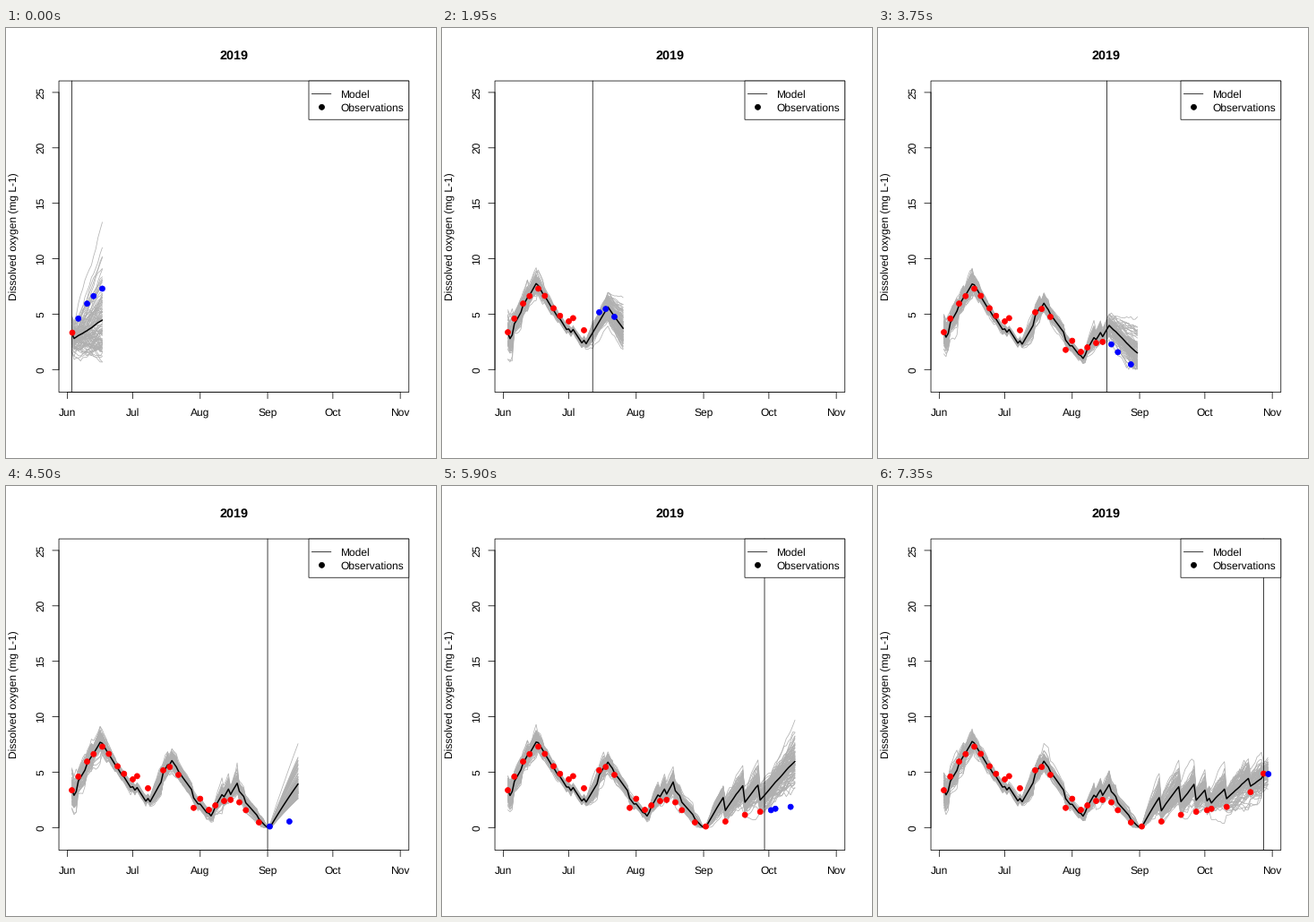
A matplotlib script for the animation above (7.4 s loop, 480 by 480 pixels).

```python
import numpy as np
import matplotlib.pyplot as plt
from matplotlib.animation import FuncAnimation
from matplotlib.collections import LineCollection, PatchCollection
from matplotlib.patches import Circle, Rectangle

SIZE, FRAMES, STEP = 480, 148, 50
FIRST, LAST, HORIZON, MEMBERS = 2, 151, 14, 100   # days since 1 June
LEFT, RIGHT, TOP, BOTTOM = 59.04, 449.76, 59.04, 406.56

# Measured oxygen by day
OBS = {2: 3.37, 5: 4.6, 9: 5.95, 12: 6.63, 16: 7.3, 19: 6.65, 23: 5.53,
       26: 4.85, 30: 4.35, 32: 4.64, 37: 3.55, 44: 5.17, 47: 5.47, 51: 4.76,
       58: 1.78, 61: 2.6, 65: 1.6, 68: 2.0, 72: 2.4, 75: 2.5, 79: 2.28,
       82: 1.57, 88: .47, 93: .1, 102: .55, 111: 1.15, 118: 1.43, 123: 1.57,
       125: 1.7, 132: 1.87, 143: 3.2, 149: 4.87, 151: 4.87}

TURNS = (16, 38, 48, 66, 78, 93)   # days on which the trend reverses


def px(day):
    return 73.51 + 361.78 * (np.asarray(day) - FIRST) / (LAST - FIRST)


def py(value):
    return 381.31 - 12.376 * np.asarray(value)


def trend(day):
    """Daily change of the free-running model."""
    if day == FIRST:
        return -.5   # spin-up
    if np.searchsorted(TURNS, day, side="right") % 2:
        return .0017 * day - .36
    return .34 * np.exp(-max(day - TURNS[-1], 0) / 65)


def ensemble(now, end):
    """Assimilate up to now, then let the members run freely to the end."""
    rng = np.random.default_rng(100 + now)
    age = now - FIRST
    skill = min(1, .4 + .06 * age)
    fan = .07 + .085 * np.exp(-age / 8)
    slope = rng.normal(size=MEMBERS)
    slope += .2 * (slope ** 2 - 1)
    z = rng.normal(size=MEMBERS)
    mean, spread = OBS[FIRST], .7
    rows = [mean + spread * z]
    for day in range(FIRST + 1, end + 1):
        change, keep = trend(day - 1), .96
        rising = change > 0
        mean = max(mean + change * (skill if rising and day > now else 1), 0)
        if day <= now:
            spread += .12 * (1 - spread) if rising else .1 * (.25 - spread)
            if day in OBS:
                gain, keep = (.6 if rising else .35), .6
                mean += gain * (OBS[day] - mean)
                spread *= np.sqrt(1 - gain)
            spread = min(spread, .03 + .45 * mean)
        z = keep * z + np.sqrt(1 - keep ** 2) * rng.normal(size=MEMBERS)
        lead = max(day - now, 0)
        rows.append(np.abs(mean + spread * z + fan * lead * slope))
    return np.array(rows)


plt.rcParams["font.family"] = "Liberation Sans"
plt.rcParams["text.hinting"] = "none"
fig = plt.figure(figsize=(SIZE / 72, SIZE / 72), dpi=72, facecolor="white")
ax = fig.add_axes([0, 0, 1, 1])
ax.set(xlim=(0, SIZE), ylim=(SIZE, 0))
ax.axis("off")


def line(x, y, z=2, width=.75):
    return ax.plot(x, y, color="black", lw=width, zorder=z, snap=False,
                   solid_capstyle="round", solid_joinstyle="round")[0]


def box(x0, y0, x1, y1, z, fill):
    ax.add_patch(Rectangle((x0, y0), x1 - x0, y1 - y0, fc=fill, ec="black",
                           lw=.75, zorder=z, snap=False))


def label(x, y, text, ha="center", size=12, **kw):
    ax.text(x, y, text, ha=ha, va="baseline", fontsize=size, zorder=9,
            rotation_mode="anchor", **kw)


def circles(x, y):
    return [Circle(p, 3) for p in zip(x, y)]


def dots(color, patches=(), z=5):
    group = PatchCollection(patches, facecolor=color, edgecolor=color,
                            linewidth=.75, zorder=z, snap=False)
    ax.add_collection(group, autolim=False)
    return group


box(LEFT, TOP, RIGHT, BOTTOM, 6, "none")
months = dict(Jun=0, Jul=30, Aug=61, Sep=92, Oct=122, Nov=153)
line(px([0, 153]), [BOTTOM, BOTTOM])
for name, day in months.items():
    x = px(day)
    line([x, x], [BOTTOM, BOTTOM + 7.2])
    label(x, 433, name)
line([LEFT, LEFT], py([0, 25]))
for v in range(0, 26, 5):
    y = py(v)
    line([LEFT - 7.2, LEFT], [y, y])
    label(42, y, str(v), rotation=90)
label(254.4, 35, "2019", size=14.4, weight="bold")
label(13, 232.5, "Dissolved oxygen (mg L-1)", rotation=90)

box(338, TOP, RIGHT, TOP + 43.2, 7, "white")
line([341.3, 362.9], [TOP + 14.4] * 2, 8)
dots("black", circles([352], [TOP + 28.8]), 8)
label(373.5, 78, "Model", "left")
label(373.5, 93, "Observations", "left")

members = LineCollection([], colors="#b0b0b0", linewidths=.75, zorder=2,
                         capstyle="round", joinstyle="round")
ax.add_collection(members, autolim=False)
mean_line = line([], [], 4, 1.5)
now_line = line([], [], 3)
past, future = dots("red"), dots("blue")
obs_day, obs_value = np.array(list(OBS.items())).T


def draw(i):
    now = FIRST + i
    end = min(now + HORIZON, LAST)
    runs = ensemble(now, end)
    x = px(np.arange(FIRST, end + 1))
    members.set_segments([np.column_stack((x, py(r))) for r in runs.T])
    mean_line.set_data(x, py(runs.mean(axis=1)))
    now_line.set_data([px(now)] * 2, [TOP, BOTTOM])
    seen = obs_day <= now
    for group, pick in ((past, seen), (future, ~seen & (obs_day <= end))):
        group.set_paths(circles(px(obs_day[pick]), py(obs_value[pick])))
    return members, mean_line, now_line, past, future


anim = FuncAnimation(fig, draw, frames=FRAMES, interval=STEP, repeat=True,
                     repeat_delay=0)
plt.show()
```
